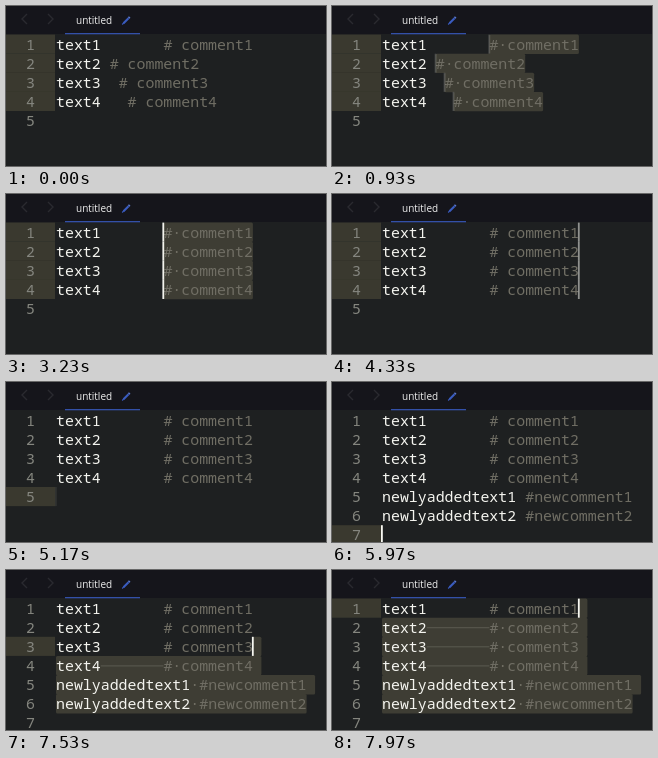
An HTML page with a canvas that plays this animation: 320 px wide and 160 px high, repeating every 8 s.

```html
<!DOCTYPE html>
<html lang="en">
<head>
<meta charset="utf-8">
<title>Aligning comments</title>
<style>
  html, body { margin: 0; width: 100%; height: 100%; overflow: hidden; background: #1e2021; }
  canvas { display: block; width: 320px; height: 160px; }
</style>
</head>
<body>
<canvas id="stage"></canvas>
<script>
const LOOP = 8000, LEFT = 50, TOP = 28.6, CHAR = 8.95, ROW = 19.1;
const BLINK = 867, HOLD = 340;
const MONO = '500 14.92px "Noto Sans Mono", "DejaVu Sans Mono", monospace';
const canvas = document.getElementById('stage');
const ctx = canvas.getContext('2d');
const scale = window.devicePixelRatio || 1;
canvas.width = 320 * scale;
canvas.height = 160 * scale;

const line = (n, col) => `text${n}`.padEnd(col) + `# comment${n}`;
const linesAt = columns => columns.map((col, i) => line(i + 1, col));
const ragged = linesAt([12, 6, 7, 8]);
const aligned = linesAt([12, 12, 12, 12]);
const extended = [...aligned, ...[1, 2].map(n => `newlyaddedtext${n} #newcomment${n}`)];

const hashes = lines => lines.map((text, row) => ({ row, col: text.indexOf('#') }));
const ends = lines => lines.map((text, row) => ({ row, col: text.length }));
const commentRanges = lines => lines.map((text, row) => ({ row, from: text.indexOf('#'), to: text.length }));

// Selection reaching from the end of `row` down to the end of the last line.
function selectUpTo(row) {
  const ranges = [];
  for (let r = row; r < extended.length; r++) {
    const length = extended[r].length;
    ranges.push({ row: r, from: r === row ? length : 0, to: length, newline: r < extended.length - 1 });
  }
  return ranges;
}

const lastEnds = ends(extended);
const extend = (at, row) => ({ at, lines: extended, carets: [lastEnds[row]], ranges: selectUpTo(row) });

// `fade` overrides the moment when a steady caret starts to blink.
const scenes = [
  { at: 0, lines: ragged, carets: [], active: [0, 1, 2, 3] },
  { at: 30, lines: ragged, carets: hashes(ragged), ranges: commentRanges(ragged), fade: 570 },
  { at: 2300, lines: aligned, carets: hashes(aligned), ranges: commentRanges(aligned), fade: 2303 },
  { at: 3730, lines: aligned, carets: ends(aligned) },
  { at: 4400, lines: aligned, carets: [{ row: 4, col: 0 }], fade: 4770 },
  { at: 5670, lines: extended, carets: [{ row: 6, col: 0 }] },
  { at: 6500, lines: extended, carets: [lastEnds[5]], fade: 6900 },
  extend(7030, 4), extend(7200, 3), extend(7370, 2), extend(7550, 1), extend(7730, 0)
];

const rowTop = row => TOP + row * ROW;
const colX = col => LEFT + col * CHAR;

function box(color, x, y, w, h) {
  ctx.fillStyle = color;
  ctx.fillRect(x, y, w, h);
}

function write(text, x, y, color) {
  ctx.fillStyle = color;
  ctx.fillText(text, x, y);
}

function stroke(color, width, points) {
  ctx.strokeStyle = color;
  ctx.lineWidth = width;
  ctx.beginPath();
  points.forEach(([x, y]) => ctx.lineTo(x, y));
  ctx.stroke();
}

function drawTabBar() {
  box('#15151b', 0, 0, 320, 28);
  box('#3350a8', 59, 27, 75, 1.3);
  stroke('#2a2a30', 1.4, [[21, 8], [16, 13], [21, 18]]);
  stroke('#2a2a30', 1.4, [[42, 8], [47, 13], [42, 18]]);
  ctx.font = '10px "Open Sans", "Noto Sans", sans-serif';
  write('untitled', 70, 17.6, '#f0f0f0');
  stroke('#3a5cc0', 2.2, [[117.5, 17.2], [122.5, 12.2]]);
  stroke('#3a5cc0', 1.2, [[116.2, 18.5], [118, 16.7]]);
  stroke('#5c7cd8', 2.2, [[122.7, 12], [123.7, 11]]);
}

function drawGutter(scene) {
  const rows = scene.active || scene.carets.map(c => c.row);
  rows.forEach(row => box('#3a392f', 0, rowTop(row), 49, ROW));
  const count = scene.lines.length + 1;
  for (let row = 0; row < count; row++) {
    write(String(row + 1), 20, rowTop(row) + 15, '#85867f');
  }
}

function drawRange({ row, from, to, newline }) {
  const width = (to - from) * CHAR + (newline ? 8.5 : 0);
  ctx.fillStyle = '#3e3d34';
  ctx.beginPath();
  ctx.roundRect(colX(from), rowTop(row), width, ROW + 0.3, 1.5);
  ctx.fill();
}

// Selected single spaces show as dots, longer gaps as a rule.
function drawSpaces(text, row, { from, to }) {
  const middle = rowTop(row) + 10;
  for (const { 0: gap, index } of text.matchAll(/ +/g)) {
    if (index < from || index >= to) continue;
    if (gap.length > 1) box('#5b5a50', colX(index), middle - 0.5, gap.length * CHAR, 1);
    else write('·', colX(index), rowTop(row) + 15, '#77756a');
  }
}

function drawLine(text, row, range) {
  const y = rowTop(row) + 15;
  const hash = text.indexOf('#');
  write(text.slice(0, hash), LEFT, y, '#f4f4ef');
  write(text.slice(hash), colX(hash), y, '#706e64');
  if (range) drawSpaces(text, row, range);
}

function caretAlpha(scene, t) {
  const start = scene.fade || scene.at + HOLD;
  if (t < start) return 1;
  const wave = 0.5 + 0.5 * Math.cos(2 * Math.PI * (t - start) / BLINK);
  return wave ** 0.6;
}

function draw(t) {
  const scene = scenes.findLast(s => s.at <= t);
  const ranges = scene.ranges || [];
  ctx.setTransform(scale, 0, 0, scale, 0, 0);
  box('#1e2021', 0, 0, 320, 160);
  drawTabBar();
  ctx.font = MONO;
  drawGutter(scene);
  ranges.forEach(drawRange);
  scene.lines.forEach((text, row) => drawLine(text, row, ranges.find(r => r.row === row)));
  ctx.globalAlpha = caretAlpha(scene, t);
  scene.carets.forEach(({ row, col }) => box('#f8f8f2', colX(col) - 1, rowTop(row), 1.8, ROW));
  ctx.globalAlpha = 1;
}

function tick() {
  draw(performance.now() % LOOP);
  requestAnimationFrame(tick);
}
tick();
</script>
</body>
</html>
```
